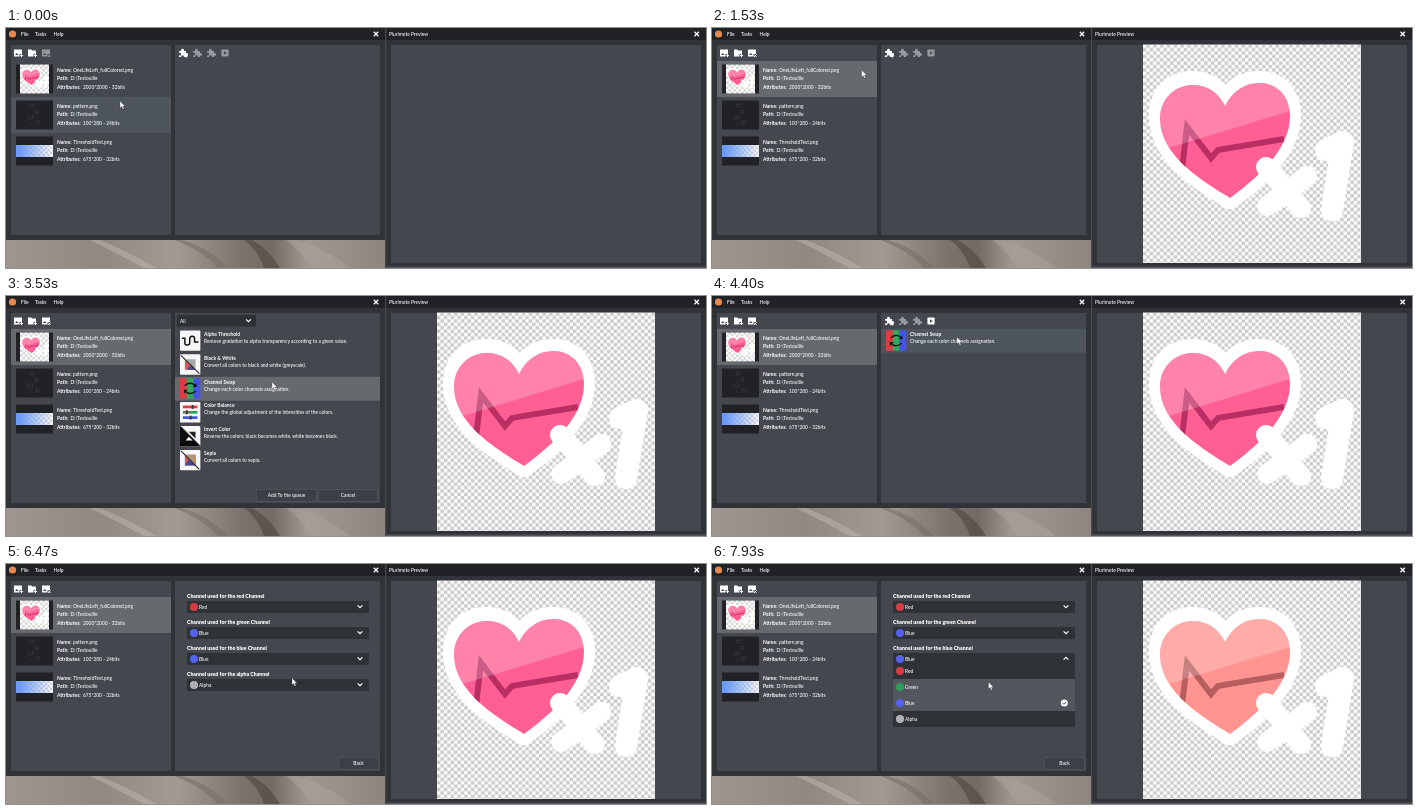
These frames come from a looping animation (700x240 px, 8000 ms). An HTML page:

```html
<!DOCTYPE html>
<html lang="en">
<head>
<meta charset="utf-8">
<title>Batch image tool</title>
<style>
  html, body { margin: 0; width: 100%; height: 100%; overflow: hidden; background: #303338; }
  svg { display: block; width: 700px; height: 240px; }
  text { font-family: Lato, "Open Sans", sans-serif; font-size: 4.85px; font-weight: 500; fill: #fff; white-space: pre; }
  .bold { font-weight: 700; font-size: 5px; }
  .label { font-weight: 900; font-size: 5.2px; }
</style>
</head>
<body>
<svg id="stage" viewBox="0 0 700 240" xmlns="http://www.w3.org/2000/svg">
  <defs>
    <pattern id="checker" width="6.8" height="6.8" patternUnits="userSpaceOnUse" x="431" y="16.5">
      <path fill="#fdfdfd" d="M0 0H6.8V6.8H0Z"/>
      <path fill="#cbcbcb" d="M3.4 0H6.8V3.4H3.4ZM0 3.4H3.4V6.8H0Z"/>
    </pattern>
    <pattern id="smallChecker" width="5" height="5" patternUnits="userSpaceOnUse" x="14" y="36">
      <path fill="#fff" d="M0 0H5V5H0Z"/>
      <path fill="#d6d6d6" d="M2.5 0H5V2.5H2.5ZM0 2.5H2.5V5H0Z"/>
    </pattern>
    <linearGradient id="blueFade">
      <stop offset=".1" stop-color="#6c9bf7"/>
      <stop offset="1" stop-color="#6c9bf7" stop-opacity="0"/>
    </linearGradient>
    <linearGradient id="fur">
      <stop offset="0" stop-color="#a0968f"/>
      <stop offset=".25" stop-color="#918882"/>
      <stop offset=".45" stop-color="#a39a93"/>
      <stop offset=".62" stop-color="#7d736c"/>
      <stop offset=".7" stop-color="#736a65"/>
      <stop offset=".79" stop-color="#a09893"/>
      <stop offset="1" stop-color="#8c8580"/>
    </linearGradient>
    <path id="halo" d="M518 170C492 154 448 128 448 88C448 66 462 54 480 54C496 54 508 63 513 76C520 61 534 53 549 54C568 55 578 70 578 87C578 122 545 150 518 170Z"/>
    <path id="heart" d="M518 170C492 154 448 128 448 91C448 71 462 58 479 57C495 56 507 65 513 78C520 63 534 54 549 55C568 56 578 71 578 88C578 122 545 150 518 170Z"/>
    <clipPath id="heartClip"><use href="#heart"/></clipPath>
    <clipPath id="photoClip"><path d="M0 212H380V240H0Z"/></clipPath>
  </defs>
  <g id="base"></g>
  <g id="preview"></g>
  <g id="files"></g>
  <g id="tools"></g>
  <path id="cursor" fill="#fff" stroke="#222" stroke-width=".3" d="M0 0V7L1.6 5.6L2.7 8.2L3.9 7.7L2.8 5.2H5Z"/>
</svg>
<script>
const LOOP = 8000, FPS = 15;
const C = {
  window: '#303338', title: '#202226', panel: '#44474d', dark: '#2e3136',
  hover: '#4e555c', picked: '#66696e', white: '#fff', dim: '#96999d'
};
const CHANNELS = ['Red', 'Green', 'Blue', 'Alpha'];
const SWATCHES = ['#d63d40', '#319d58', '#5561f0', '#b9b9b9'];
const FILES = [
  ['OneLifeLeft_fullColored.png', '2000*2000 - 32bits'],
  ['pattern.png', '100*280 - 24bits'],
  ['ThresholdTest.png', '675*200 - 32bits']
];
const EFFECTS = [
  ['Alpha Threshold', 'Remove gradation to alpha transparency according to a given value.'],
  ['Black & White', 'Convert all colors to black and white (greyscale).'],
  ['Channel Swap', 'Change each color channels assignation.'],
  ['Color Balance', 'Change the global adjustment of the intensities of the colors.'],
  ['Invert Color', 'Reverse the colors: black becomes white, white becomes black.'],
  ['Sepia', 'Convert all colors to sepia.']
];
// Moments, in ticks of 1/15 s
const AT = {
  select: 16, load: 20, list: 33, pick: 53, queue: 57, settings: 72,
  openGreen: 84, setBlue: 97, recolor: 101, openBlue: 108
};
// Cursor path: tick, x, y
const PATH = [
  [0, 114, 73], [3, 104.5, 50], [17, 104.5, 50], [28, 184, 36], [30, 178, 24], [36, 178, 24],
  [39, 217.5, 52], [44, 262, 82], [48, 262, 82], [50, 266, 86], [61, 266, 86], [66, 245, 41],
  [68, 245, 42], [72, 245, 42], [77, 267, 64], [79, 267, 64], [81, 301, 68], [88, 301, 68],
  [94, 286, 114], [102, 286, 114], [105, 274, 94], [113, 274, 94], [119, 276.5, 118]
];

const $ = id => document.getElementById(id);
const esc = s => s.replace(/&/g, '&amp;');
const rect = (x, y, w, h, fill, extra = '') =>
  `<rect x="${x}" y="${y}" width="${w}" height="${h}" fill="${fill}" ${extra}/>`;
const circle = (x, y, r, fill) => `<circle cx="${x}" cy="${y}" r="${r}" fill="${fill}"/>`;
const shape = (d, fill) => `<path d="${d}" fill="${fill}"/>`;
const line = (d, stroke, width, extra = '') =>
  `<path d="${d}" fill="none" stroke="${stroke}" stroke-width="${width}" ${extra}/>`;
const text = (x, cy, s, cls = '', extra = '') =>
  `<text x="${x}" y="${cy + 1.7}" class="${cls}" ${extra}>${esc(s)}</text>`;
const at = (x, y, body) => `<g transform="translate(${x} ${y})">${body}</g>`;
const cross = (x, y) => at(x, y, line('M-2.2 -2.2L2.2 2.2M2.2 -2.2L-2.2 2.2', '#fff', 1.3));
const chevron = (x, y, up) => at(x, y, line(up ? 'M-2.4 1.2L0 -1.2L2.4 1.2' : 'M-2.4 -1.2L0 1.2L2.4 -1.2', '#fff', 1.2));
const button = (x, y, w, label, color = C.white) =>
  rect(x + .25, y + .25, w - .5, 12, '#3c3f45', 'stroke="#5b5e64" stroke-width=".5"') +
  text(x + w / 2, y + 6.2, label, '', `text-anchor="middle" style="fill:${color}"`);

function photo() {
  return `<g clip-path="url(#photoClip)">${rect(0, 212, 380, 28, 'url(#fur)')}<g opacity=".55">` +
    shape('M238 212Q252 222 258 240H274Q262 220 246 212Z', '#4b433f') +
    shape('M176 212Q204 220 222 240H212Q196 222 168 212Z', '#776d66') +
    shape('M94 212Q124 224 150 240H138Q112 226 84 212Z', '#bcb3ad') +
    shape('M292 212Q322 222 344 240H306Q296 224 280 212Z', '#aaa39e') + '</g></g>';
}

function base() {
  return rect(0, 0, 700, 240, C.window) + rect(0, 0, 700, 12, C.title) + photo() +
    circle(6.5, 6, 3.6, '#e8894f') +
    text(15, 6, 'File') + text(29, 6, 'Tasks') + text(47.5, 6, 'Help') +
    cross(370, 6) + cross(690.7, 6) +
    rect(379, 0, 1.2, 240, '#4a4b4e') + text(383, 6, 'Plurimote Preview') +
    rect(5, 17, 160, 190, C.panel) + rect(169, 17, 205, 190, C.panel) +
    rect(385, 17, 310, 218, C.panel) + rect(380, 238.5, 320, 1.5, '#55565a');
}

function badge(main, ecg) {
  return '<use href="#halo" fill="#fff" stroke="#fff" stroke-width="22" stroke-linejoin="round"/>' +
    `<use href="#heart" fill="${main}"/><g clip-path="url(#heartClip)">` +
    line('M469 150L475 99L499 130L506 122L572 111', ecg, 6) +
    shape('M440 125L585 81V45H440Z', 'rgba(255,255,255,.22)') + '</g>' +
    '<g stroke-linecap="round" stroke-linejoin="round">' +
    line('M554 139L589 180M595 148L555 178', '#fff', 20) +
    line('M614 122L631 114L620 182', '#fff', 22) + '</g>';
}

function preview(tick) {
  if (tick < AT.load) return '';
  const art = tick < AT.recolor ? badge('#ff5f93', '#b92f64') : badge('#ff9491', '#b65f5e');
  return rect(431, 16.5, 218, 218.5, 'url(#checker)') + art;
}

function thumb(i) {
  const y = 36.5 + i * 36;
  const frame = rect(10, y, 37, 29, '#202226');
  if (i === 0) return frame + rect(14, y, 29, 29, 'url(#smallChecker)') +
    `<g transform="translate(14 36.5) scale(.134) translate(-431 -17)">${badge('#ff5f93', '#b92f64')}</g>`;
  if (i === 1) return frame + line('M24 76h4v3h-4zM29 82h3v3h-3zM22 88h5v3h-5zM30 93h4v3h-4zM24 96h3', '#45474a', .5);
  return frame + rect(10, 117, 37, 12, 'url(#smallChecker)') + rect(10, 117, 37, 12, 'url(#blueFade)');
}

function fileIcons(selected) {
  const pic = shape('M-4 -3.5H4V1H1.5V3.5H-4Z', 'currentColor') + shape('M-3 2L-1.2 0L.6 2Z', C.panel);
  const folder = shape('M-4 -3.5H-.8L.2 -2.4H4V1H1.5V3.5H-4Z', 'currentColor');
  const plus = line('M2 2.6H5M3.5 1.1V4.1', 'currentColor', 1);
  const minus = line('M2 1.4L4.6 4M4.6 1.4L2 4', 'currentColor', .9);
  const icon = (x, body, on) => `<g color="${on ? '#fff' : C.dim}">${at(x, 25, body)}</g>`;
  return icon(12, pic + plus, true) + icon(26, folder + plus, true) + icon(40, pic + minus, selected);
}

function files(tick, [x, y]) {
  const selected = tick >= AT.select;
  let out = fileIcons(selected);
  FILES.forEach(([name, info], i) => {
    const top = 33 + i * 36;
    const over = x < 165 && y >= top && y < top + 36;
    if (selected && i === 0) out += rect(5, top, 160, 36, C.picked);
    else if (over) out += rect(5, top, 160, 36, C.hover);
    out += thumb(i);
    [['Name:', name, 67], ['Path:', 'D:\\Testouille', 64.5], ['Attributes:', info, 77]].forEach(([key, value, vx], k) => {
      const cy = top + 9 + k * 8.5;
      out += text(51, cy, key, 'bold') + text(vx, cy, value);
    });
  });
  return out;
}

function queueIcons(filled, over) {
  const puzzle = shape('M-4 -2H-1.8A1.5 1.5 0 1 1 .8 -2H3V.2A1.4 1.4 0 1 1 3 2.6V4H.9A1.4 1.4 0 1 0 -1.8 4H-4V2.2A1.4 1.4 0 1 0 -4 -.2Z', 'currentColor');
  const icon = (x, body, on) => `<g color="${on ? '#fff' : C.dim}">${at(x, 25, body)}</g>`;
  return (over ? rect(171, 18.5, 12.5, 12.5, '#565b62') : '') +
    icon(177, puzzle + line('M1.8 3H5M3.4 1.4V4.6', 'currentColor', 1), true) +
    icon(191, puzzle, false) + icon(205, puzzle, false) +
    icon(219, rect(-3.6, -3.6, 7.2, 7.2, 'currentColor', 'rx=".8"') + shape('M-1 -1.8L1.8 0L-1 1.8Z', C.panel), filled);
}

function effectIcon(i) {
  const white = rect(0, 0, 21, 21, '#f6f6f6', 'rx="1"');
  const picture = rect(5, 5, 11, 11, '#d85a5c') + shape('M5 16L9 10L12 13L16 8V16Z', '#3d4c8f');
  const slash = line('M1 1L20 20', '#26282b', 1.1);
  return [
    () => white + line('M2 8H5V13Q5 15 7.5 15T10 13V9Q10 6 12.5 6T15 8V12H19', '#111', 1.5),
    () => white + shape('M5 5H16V16Z', '#a8a8a8') + shape('M5 5V16H16Z', '#d85a5c') + shape('M7 16L11 11L16 16Z', '#3d4c8f') + slash,
    () => rect(0, 0, 7, 21, '#e13a42') + rect(7, 0, 7, 21, '#31a85c') + rect(14, 0, 7, 21, '#4653e6') +
      line('M5 8A6 5 0 0 1 15 7M16 13A6 5 0 0 1 6 14', '#111', 1.4) + shape('M17 5V9H13ZM4 16V12H8Z', '#111'),
    () => white + ['#dc3c42', '#2ea35a', '#4755dc'].map((c, k) =>
      line(`M3 ${5 + k * 5.5}H18`, c, 2.8) + rect([12, 6, 10][k], 3 + k * 5.5, 2, 4, '#333')).join(''),
    () => white + shape('M0 0L21 21H0Z', '#0c0c0d') + shape('M6 15L9 11L13 15Z', '#fff') + shape('M9 6H16V13Z', '#222') + slash,
    () => white + picture + shape('M5 5H16V16Z', '#b39372') + slash
  ][i]();
}

function effectRow(i, top, fill) {
  const [name, about] = EFFECTS[i];
  return (fill ? rect(169, top, 205, 23.9, fill) : '') +
    at(174, top + 1.4, `<g transform="scale(.97)">${effectIcon(i)}</g>`) +
    text(198, top + 5, name, 'bold') + text(198, top + 12, about);
}

function effectList(tick, [, y]) {
  const picked = tick >= AT.pick;
  let out = rect(171, 19, 79, 11.5, C.dark) + text(174, 24.8, 'All') + chevron(242.5, 24.5);
  EFFECTS.forEach((_, i) => {
    const top = 33 + i * 23.9;
    const over = y >= top && y < top + 23.9;
    out += effectRow(i, top, picked && i === 2 ? C.picked : over ? C.hover : '');
  });
  return out + button(250, 193, 61, 'Add To the queue', picked ? C.white : '#7d8085') + button(312, 193, 60, 'Cancel');
}

const option = (channel, cy) => circle(188, cy, 4, SWATCHES[channel]) +
  (channel === 3 ? line(`M185 ${cy}H191M188 ${cy - 3}V${cy + 3}`, '#8f8f8f', 1.2, 'stroke-dasharray="1.2"') : '') +
  text(193, cy + .2, CHANNELS[channel]);

function dropdown(cy, value, y) {
  let out = rect(181, cy + 4, 182, 64, C.dark);
  CHANNELS.forEach((_, k) => {
    const top = cy + 4 + k * 16;
    const over = y > cy + 6 && y >= top && y < top + 16;
    if (k === value || over) out += rect(181, top, 182, 16, '#53575d');
    out += option(k, top + 8);
    if (k === value) out += circle(352.3, top + 8, 3.5, '#fff') + line(`M350.6 ${top + 8}l1.3 1.3l2.3 -2.5`, C.dark, .9);
  });
  return out;
}

function settings(tick, [, y]) {
  const values = [0, tick < AT.setBlue ? 1 : 2, 2, 3];
  const open = tick >= AT.openBlue ? 2 : tick >= AT.openGreen && tick < AT.setBlue ? 1 : -1;
  const row = (value, i) => {
    const cy = 43 + i * 26;
    return text(181, cy - 11, `Channel used for the ${CHANNELS[i].toLowerCase()} Channel`, 'label') +
      rect(181, cy - 6, 182, 12, C.dark) + option(value, cy) + chevron(354, cy - .5, i === open);
  };
  return values.map(row).join('') +
    (open < 0 ? '' : dropdown(43 + open * 26, values[open], y)) + button(332, 193, 41, 'Back');
}

function tools(tick, tip) {
  const [x, y] = tip;
  if (tick >= AT.settings) return settings(tick, tip);
  if (tick >= AT.queue) return queueIcons(true) + effectRow(2, 33, y >= 33 && y < 57 ? C.hover : '');
  if (tick >= AT.list) return effectList(tick, tip);
  return queueIcons(false, x > 171 && x < 184 && y > 18 && y < 31);
}

function cursorAt(tick) {
  const next = PATH.findIndex(p => p[0] >= tick);
  if (next <= 0) return PATH[0].slice(1);
  const [t0, x0, y0] = PATH[next - 1], [t1, x1, y1] = PATH[next];
  const u = (tick - t0) / (t1 - t0), e = u * u * (3 - 2 * u);
  return [x0 + (x1 - x0) * e, y0 + (y1 - y0) * e];
}

let shown = -1;
function draw(ms) {
  const tick = Math.min(119, Math.floor((ms % LOOP) * FPS / 1000 + .1));
  if (tick === shown) return;
  shown = tick;
  const tip = cursorAt(tick);
  $('preview').innerHTML = preview(tick);
  $('files').innerHTML = files(tick, tip);
  $('tools').innerHTML = tools(tick, tip);
  $('cursor').setAttribute('transform', `translate(${tip})`);
}

$('base').innerHTML = base();
const start = performance.now();
function loop() {
  draw(performance.now() - start);
  requestAnimationFrame(loop);
}
loop();
</script>
</body>
</html>
```
